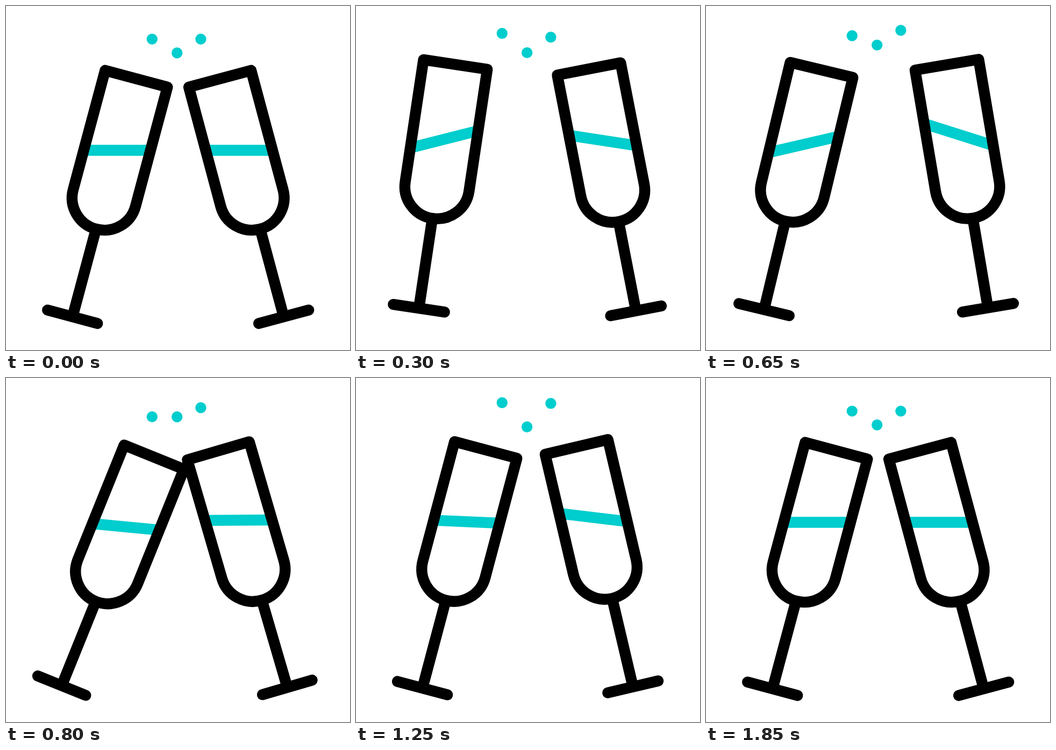
An HTML page with a canvas that plays this animation: 640x640 px, repeating every 1.9 s.

```html
<!DOCTYPE html>
<html lang="en">
<head>
<meta charset="utf-8">
<title>Cheers</title>
<style>
  html, body { margin: 0; width: 100%; height: 100%; overflow: hidden; background: #fff; }
  canvas { display: block; }
</style>
</head>
<body>
<canvas id="stage" width="640" height="640"></canvas>
<script>
const ctx = document.getElementById('stage').getContext('2d');
const LOOP = 1900, STEP = 50;
const INK = '#000', TEAL = '#00cdcd', LINE = 20.4;
const TILT = 15, HALF = 60, RIM = -229.5, FOOT = 229, LEVEL = -91.6;
const rad = deg => deg * Math.PI / 180;

// Eased value on a track of key times and key values
function track(times, values, t) {
  if (t <= times[0]) return values[0];
  for (let i = 1; i < times.length; i++) {
    if (t < times[i]) {
      const x = (t - times[i - 1]) / (times[i] - times[i - 1]);
      return values[i - 1] + (values[i] - values[i - 1]) * x * x * (3 - 2 * x);
    }
  }
  return values[values.length - 1];
}

const SWING = [0, 500, 800, 1050, 1300];
const SLOSH = [0, 500, 800, 1050, 1300, 1550];
const FLOAT = [0, 500, 900, 1150, 1600];
const RISE = [0, -16.4, 15.5, -17.9, 0];

const glasses = [
  {
    flip: false, delay: 0,
    tilt: [0, -10, 7, -1.1, 0],
    x: [0, -49.5, 6.4, -5.8, 0],
    y: [0, -32.7, 3, -13, 0],
    roll: [0, -15.4, -0.4, -6.7, 7.7, 0],
    lift: [0, 5.6, 1.7, 2.8, -1.2, 0]
  },
  {
    flip: true, delay: 50,
    tilt: [0, -8, 2, -5, 0],
    x: [0, -39.5, 1.2, -15.5, 0],
    y: [0, -29.3, 1, -15.2, 0],
    roll: [0, -13.4, 3.5, -14.5, 12.3, 0],
    lift: [0, -6.4, -2.4, -3.4, -2.5, 0]
  }
];

const bubbles = [
  { x: 271.8, y: 61.6, delay: 0 },
  { x: 318.2, y: 87.3, delay: 250 },
  { x: 362.4, y: 61.6, delay: 150 }
];

function bowl() {
  ctx.beginPath();
  ctx.moveTo(-HALF, RIM);
  ctx.lineTo(HALF, RIM);
  ctx.lineTo(HALF, 0);
  ctx.arc(0, 0, HALF, 0, Math.PI);
  ctx.closePath();
}

function segment(x1, y1, x2, y2, cap) {
  ctx.lineCap = cap;
  ctx.beginPath();
  ctx.moveTo(x1, y1);
  ctx.lineTo(x2, y2);
  ctx.stroke();
}

function drawGlass(g, t) {
  const swing = t - g.delay, slosh = swing - 50;
  ctx.save();
  if (g.flip) {
    ctx.translate(640.4, 0);
    ctx.scale(-1, 1);
  }
  ctx.translate(183 + track(SWING, g.x, swing), 357 + track(SWING, g.y, swing));
  ctx.rotate(rad(TILT + track(SWING, g.tilt, swing)));
  ctx.lineWidth = LINE;
  ctx.lineJoin = 'round';

  ctx.save();
  bowl();
  ctx.clip();
  ctx.translate(0, LEVEL + track(SLOSH, g.lift, slosh));
  ctx.rotate(rad(track(SLOSH, g.roll, slosh) - TILT));
  ctx.strokeStyle = TEAL;
  segment(-110, 0, 110, 0, 'butt');
  ctx.restore();

  ctx.strokeStyle = INK;
  bowl();
  ctx.stroke();
  segment(0, HALF, 0, FOOT, 'butt');
  segment(-48.2, FOOT, 48.2, FOOT, 'round');
  ctx.restore();
}

function drawBubble(b, t) {
  ctx.fillStyle = TEAL;
  ctx.beginPath();
  ctx.arc(b.x, b.y + track(FLOAT, RISE, t - b.delay), LINE / 2, 0, 2 * Math.PI);
  ctx.fill();
}

const start = performance.now();

function frame() {
  const elapsed = Math.max(0, performance.now() - start) % LOOP;
  const t = Math.floor(elapsed / STEP) * STEP;
  ctx.fillStyle = '#fff';
  ctx.fillRect(0, 0, 640, 640);
  glasses.forEach(g => drawGlass(g, t));
  bubbles.forEach(b => drawBubble(b, t));
  requestAnimationFrame(frame);
}
frame();
</script>
</body>
</html>
```
